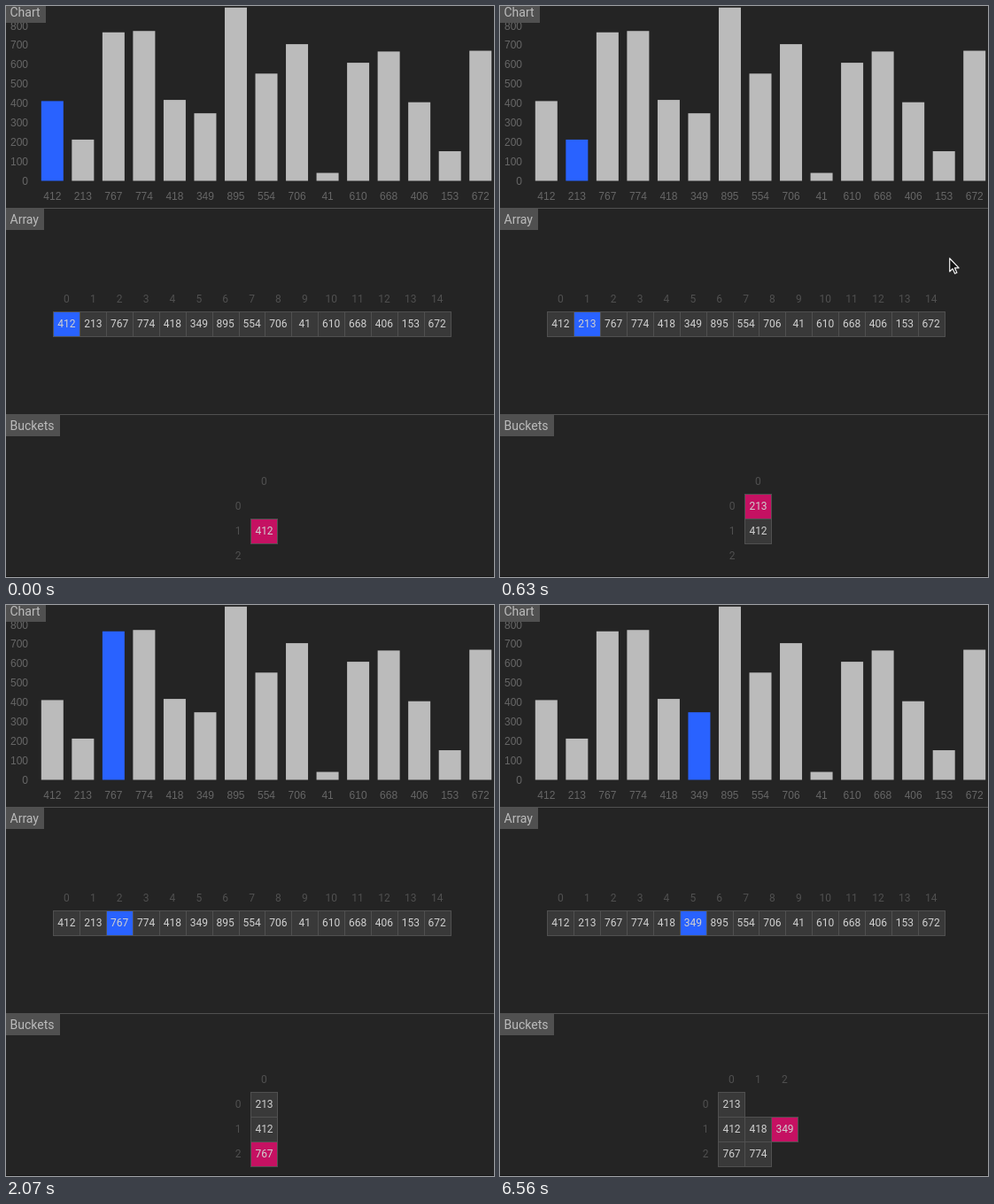
Animation, 551 px wide and 645 px high, one loop 8 s. Source, as an HTML page with a canvas:

```html
<!DOCTYPE html>
<html lang="en">
<head>
<meta charset="utf-8">
<title>Bucket sort</title>
<style>
html, body { margin: 0; width: 100%; height: 100%; overflow: hidden; background: #242424; }
canvas { display: block; }
</style>
</head>
<body>
<canvas id="stage" width="551" height="645"></canvas>
<script>
const ctx = document.getElementById('stage').getContext('2d');
const LOOP = 8000;
const DARK = '#242424', CELL = '#393939', LINE = '#505050', FONT = '#bbbbbb';
const BLUE = '#2962ff', PINK = '#c51162';
const ROBOTO = 'Roboto, sans-serif';
const ARIAL = '"Liberation Sans", Arial, sans-serif';

const values = [412, 213, 767, 774, 418, 349, 895, 554, 706, 41, 610, 668, 406, 153, 672];
const stepTimes = [0, 630, 2070, 3600, 5030, 6560];

// Bucket range is 0-299, 300-599, 600-899.
const bucketOf = v => Math.floor(v / 300);

// [time, x, y]; the pointer jumps between these and hides without a position.
const pointer = [[0], [270, 448, 143], [360, 502, 190], [540, 499, 271],
  [630, 507, 284], [810, 525, 299], [900]];

function rect(x, y, w, h, color) {
  ctx.fillStyle = color;
  ctx.fillRect(x, y, w, h);
}

function text(str, x, y, color, font, align = 'center') {
  ctx.font = font;
  ctx.fillStyle = color;
  ctx.textAlign = align;
  ctx.fillText(str, x, y);
}

function cell(x, y, right, value, center, color) {
  rect(x, y, right - x + 1, 29, LINE);
  rect(x + 1, y + 1, right - x - 1, 27, color);
  text(value, center, y + 18, '#d0d0d0', '12px ' + ROBOTO);
}

const index = (n, x, y) => text(n, x, y, LINE, '12px ' + ROBOTO);

function title(str, y, width) {
  rect(0, y, width, 24, LINE);
  text(str, 4.5, y + 17, FONT, '14px ' + ROBOTO, 'left');
}

function drawChart(active) {
  const base = 197.5, scale = 0.2187, font = '12px ' + ARIAL;
  for (let k = 0; k <= 8; k++) {
    text(k * 100, 25, 201.5 - k * 100 * scale, '#666666', font, 'right');
  }
  values.forEach((v, i) => {
    const x = 39.8 + 34.53 * i;
    rect(x, base - v * scale, 25, v * scale, i === active ? BLUE : FONT);
    text(v, x + 12.5, 218.5, '#666666', font);
  });
}

function drawArray(active) {
  const edge = i => Math.round(53.4 + 29.88 * i);
  values.forEach((v, i) => {
    const center = 68.4 + 29.88 * i;
    index(i, center, 335);
    cell(edge(i), 345, edge(i + 1), v, center, i === active ? BLUE : CELL);
  });
}

function drawBuckets(active) {
  const rows = [[], [], []];
  values.slice(0, active + 1).forEach(v => rows[bucketOf(v)].push(v));
  const cols = Math.max(...rows.map(r => r.length));
  const left = 291 - 15 * cols;
  const top = active < 2 ? 551 : 550;
  for (let c = 0; c < cols; c++) index(c, left + 15.3 + 30 * c, top - 10);
  rows.forEach((row, r) => {
    const y = top + 28 * r;
    index(r, left - 14, y + 18);
    row.forEach((v, c) => {
      const x = left + 30 * c;
      cell(x, y, x + 30, v, x + 15.5, v === values[active] ? PINK : CELL);
    });
  });
}

function drawPointer(x, y) {
  const shape = [[0, 0], [0, 15], [3.4, 11.8], [5.9, 17.3], [8.2, 16.3], [5.8, 10.9], [10.4, 10.9]];
  ctx.beginPath();
  shape.forEach(([dx, dy]) => ctx.lineTo(x + 0.7 + dx, y + 1 + dy));
  ctx.closePath();
  ctx.fillStyle = '#111111';
  ctx.fill();
  ctx.strokeStyle = '#f0f0f0';
  ctx.lineWidth = 1.2;
  ctx.lineJoin = 'round';
  ctx.stroke();
}

function draw(t) {
  const active = stepTimes.filter(s => s <= t).length - 1;
  rect(0, 0, 551, 645, DARK);
  drawChart(active);
  drawArray(active);
  drawBuckets(active);
  rect(0, 228, 551, 1, LINE);
  rect(0, 461, 551, 1, LINE);
  rect(0, 644, 551, 1, '#161616');
  title('Chart', -5, 45);
  title('Array', 229, 43);
  title('Buckets', 462, 61);
  const [, x, y] = pointer.filter(p => p[0] <= t).pop();
  if (x !== undefined) drawPointer(x, y);
}

const start = performance.now();
function tick() {
  draw((performance.now() - start) % LOOP);
  requestAnimationFrame(tick);
}
tick();
</script>
</body>
</html>
```
